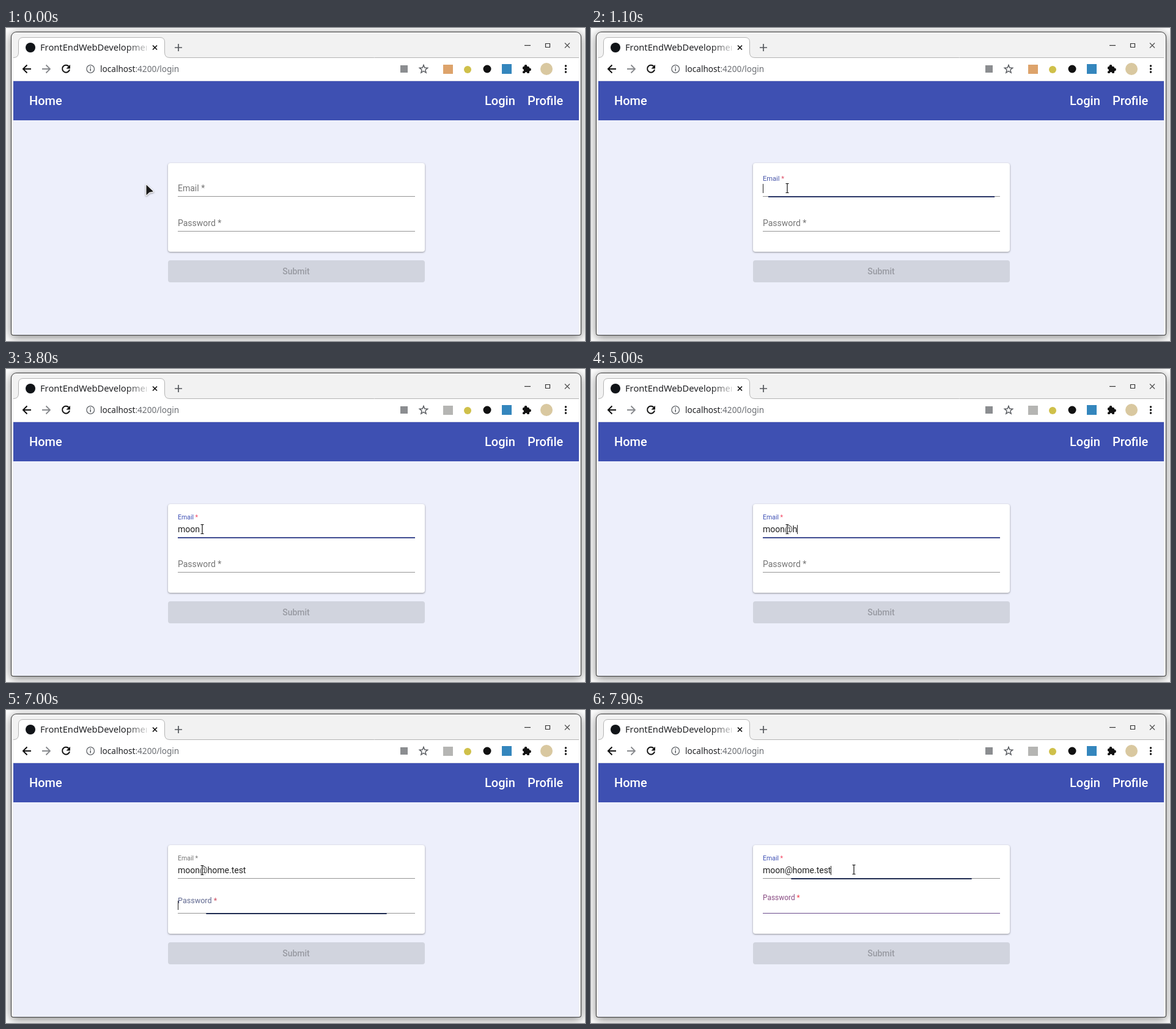
Animation, 947 px wide and 512 px high, one loop 8000 ms. Source, as an HTML page with a canvas:

```html
<!DOCTYPE html>
<html lang="en">
<head>
<meta charset="utf-8">
<title>Login form</title>
<style>
html, body { margin: 0; width: 100%; height: 100%; overflow: hidden; background: #fff; }
canvas { display: block; width: 100%; height: 100%; }
</style>
</head>
<body>
<canvas id="stage" width="947" height="512"></canvas>
<script>
const ctx = document.getElementById('stage').getContext('2d');
const LOOP = 8000, STEP = 100;
const UI = '"Noto Sans", sans-serif', FORM = 'Roboto, sans-serif';
const GREY = [117, 117, 117], BLUE = [63, 81, 181], PINK = [244, 67, 96], RED = [244, 67, 54];
const NAVY = [30, 42, 80], INDIGO = [63, 75, 145];
const ADDRESS = 'moon@home.test';
// [time, number of characters typed]; one stray letter comes first
const KEYS = [[2500, 0], [2700, 2], [3200, 4], [4000, 5], [5000, 6], [5200, 7], [5400, 8],
  [5500, 9], [5700, 10], [6300, 11], [6500, 12], [6700, 14]];
const EMAIL_FOCUS = 967, PASS_FOCUS = 6950, EMAIL_AGAIN = 7850;

const clamp = v => Math.max(0, Math.min(1, v));
const lerp = (a, b, k) => a + (b - a) * k;
const mix = (a, b, k) => a.map((v, i) => Math.round(lerp(v, b[i], k)));
const rgb = c => `rgb(${c})`;

// cubic-bezier(.25, .8, .25, 1)
function ease(x) {
  if (x <= 0) return 0;
  if (x >= 1) return 1;
  let lo = 0, hi = 1;
  for (let i = 0; i < 24; i++) {
    const s = (lo + hi) / 2, r = 1 - s;
    if (0.75 * r * s * (r + s) + s ** 3 < x) lo = s; else hi = s;
  }
  const r = 1 - lo;
  return 2.4 * r * r * lo + 3 * r * lo * lo + lo ** 3;
}

function rect(x, y, w, h, color) {
  ctx.fillStyle = color;
  ctx.fillRect(x, y, w, h);
}

function round(x, y, w, h, r, color) {
  ctx.beginPath();
  ctx.roundRect(x, y, w, h, r);
  ctx.fillStyle = color;
  ctx.fill();
}

function disc(x, y, r, color) {
  ctx.beginPath();
  ctx.arc(x, y, r, 0, 7);
  ctx.fillStyle = color;
  ctx.fill();
}

function stroke(d, color, width = 1) {
  ctx.strokeStyle = color;
  ctx.lineWidth = width;
  ctx.stroke(new Path2D(d));
}

function text(str, x, y, font, color, align = 'left') {
  ctx.font = font;
  ctx.fillStyle = color;
  ctx.textAlign = align;
  ctx.fillText(str, x, y);
}

function shadow(color, blur, dy) {
  ctx.shadowColor = color;
  ctx.shadowBlur = blur;
  ctx.shadowOffsetY = dy;
}

const noShadow = () => shadow('transparent', 0, 0);

function drawWindow() {
  rect(0, 0, 947, 512, '#fff');
  shadow('rgba(0,0,0,.5)', 16, 3);
  round(8, 6, 933, 497, [9, 9, 4, 4], '#3c3c3c');
  noShadow();
  round(9, 7, 931, 495, [8, 8, 3, 3], '#f2f2f2');
  rect(12, 48, 925, 39, '#fff');
  rect(12, 87, 925, 412, '#edeffb');
  rect(12, 499, 925, 3, '#edeffb');
  rect(12, 86, 925, 1, '#d9dbe6');
  rect(12, 87, 925, 64, '#3e50b2');
}

function drawTab() {
  ctx.fillStyle = '#fff';
  const tab = 'M12 48.5 Q20.5 48.5 20.5 40 V23 Q20.5 15.5 28 15.5 H252 Q259.5 15.5 259.5 23 V40 Q259.5 48.5 268 48.5';
  ctx.fill(new Path2D(tab));
  stroke(tab + ' H937', '#b4b4b4');
  rect(22, 48, 236, 1, '#fff');
  disc(40, 32, 8, '#111418');

  const fade = ctx.createLinearGradient(196, 0, 232, 0);
  fade.addColorStop(0, '#202124');
  fade.addColorStop(1, 'rgba(32,33,36,.15)');
  ctx.save();
  ctx.beginPath();
  ctx.rect(50, 16, 180, 30);
  ctx.clip();
  text('FrontEndWebDevelopment', 56, 37, '14.7px ' + UI, fade);
  ctx.restore();

  stroke('M240 28.5 l7 7 m0 -7 l-7 7', '#111', 1.7);
  stroke('M276 32 h12 M282 26 v12', '#55585d', 1.7);
  stroke('M848 28.5 h10', '#333', 1.2);
  stroke('M882.5 25.5 h7 v6 h-7 z', '#333', 1.2);
  stroke('M914 24.5 l8 8 m0 -8 l-8 8', '#555', 1.3);
}

function drawStar(x, y) {
  ctx.beginPath();
  for (let i = 0; i < 10; i++) {
    const a = i * Math.PI / 5 - Math.PI / 2, r = i % 2 ? 3 : 7;
    ctx.lineTo(x + r * Math.cos(a), y + r * Math.sin(a));
  }
  ctx.closePath();
  ctx.strokeStyle = '#55585d';
  ctx.lineWidth = 1.4;
  ctx.stroke();
}

function drawAddressBar(t) {
  stroke('M41 67 H28.5 M34.5 60.5 L28 67 L34.5 73.5', '#111', 2);
  stroke('M59 67 H71.5 M65.5 60.5 L72 67 L65.5 73.5', '#87898d', 1.8);
  stroke('M102.5 62.5 A6 6 0 1 0 104 68', '#111', 2);
  ctx.fillStyle = '#111';
  ctx.fill(new Path2D('M105 60 v6.5 h-6.5 z'));
  stroke('M144.5 67 a6.3 6.3 0 1 1 -12.6 0 a6.3 6.3 0 1 1 12.6 0', '#5f6368', 1.3);
  rect(137.4, 66, 1.6, 4.5, '#5f6368');
  rect(137.4, 63, 1.6, 1.7, '#5f6368');

  const font = '13.6px ' + UI, host = 'localhost';
  text(host, 154, 72, font, '#202124');
  text(':4200/login', 154 + ctx.measureText(host).width, 72, font, '#6b6e73');

  rect(645, 61, 12, 12, '#8b8d90');
  drawStar(683, 67.5);
  rect(715, 60, 16, 15, t < 2000 ? '#dda36b' : '#b5b5b3');
  disc(755, 68, 6, '#cfc04a');
  disc(787, 67, 6.5, '#111');
  rect(811, 59, 16, 16, '#3486bd');

  round(845, 63, 11, 11, 1.5, '#111');
  disc(850, 62.5, 2.4, '#111');
  disc(856.5, 68, 2.4, '#111');
  disc(845, 69, 2, '#fff');
  disc(850.5, 74, 2, '#fff');

  disc(884, 67, 10, '#d9c8a0');
  for (const y of [62, 67, 72]) disc(915.5, y, 1.7, '#111');
}

function drawPage() {
  const nav = '500 20px ' + FORM;
  text('Home', 38, 126, nav, '#fff');
  text('Login', 783, 126, nav, '#fff');
  text('Profile', 853, 126, nav, '#fff');

  shadow('rgba(0,0,0,.4)', 3, 1);
  round(265, 221, 420, 145, 4, '#fff');
  noShadow();
  round(265, 380, 420, 36, 4, '#d1d4de');
  text('Submit', 474.5, 403, '500 14px ' + FORM, '#989aa2', 'center');
}

// float: 0 = resting inside the field, 1 = small above it
function drawLabel(name, base, float, color, starColor) {
  ctx.save();
  ctx.translate(281, base - 21 * float);
  ctx.scale(1 - float / 4, 1 - float / 4);
  const font = '14px ' + FORM;
  text(name + ' ', 0, 0, font, rgb(color));
  text('*', ctx.measureText(name + ' ').width, 0, font, rgb(starColor));
  ctx.restore();
}

function drawRipple(y, age) {
  const k = ease(age / 300), w = 388 * (0.5 + k / 2);
  rect(475 - w / 2, y, w, 2, rgb(mix(NAVY, INDIGO, clamp((age - 50) / 250))));
}

function drawCaret(x, y, age) {
  if (age >= 0 && age < 600) rect(Math.round(x), y, 1, 15, '#222');
}

function drawEmail(t) {
  const again = t >= EMAIL_AGAIN;
  const focused = again || (t >= EMAIL_FOCUS && t < PASS_FOCUS);
  const start = again ? EMAIL_AGAIN : EMAIL_FOCUS;
  const float = ease((t - EMAIL_FOCUS) / 400);
  const tint = focused ? (again ? 1 : float) : 0;
  rect(281, 275, 388, 1, '#949494');
  drawLabel('Email', 267, float, mix(GREY, BLUE, tint), mix(GREY, PINK, tint));

  let value = t >= 1800 ? 'd' : '', last = t >= 1800 ? 1800 : start;
  for (const [time, count] of KEYS) {
    if (t >= time) {
      value = ADDRESS.slice(0, count);
      last = time;
    }
  }
  text(value, 281, 267, '14px ' + FORM, '#212121');
  if (!focused) return;
  drawRipple(275, t - start);
  drawCaret(281 + ctx.measureText(value).width, 255, t - Math.max(last, start));
}

function drawPassword(t) {
  const left = t >= EMAIL_AGAIN, age = t - PASS_FOCUS;
  const back = ease((t - EMAIL_AGAIN) / 400);
  const float = ease(age / 400) * (1 - back);
  const tint = ease(age / 400);
  const color = left ? mix(BLUE, RED, back) : mix(GREY, BLUE, tint);
  const star = left ? mix(PINK, RED, back) : mix(GREY, PINK, age > 0 ? 0.5 + tint / 2 : 0);
  rect(281, 332, 388, 1, left ? '#6a4a8c' : '#949494');
  if (!left && age >= 0) {
    drawRipple(332, age);
    drawCaret(281, 312, age);
  }
  drawLabel('Password', 324, float, color, star);
}

function drawArrow(x, y) {
  ctx.save();
  ctx.translate(x, y);
  const d = 'M.5 .5 L12 11.5 L5.5 12.8 L.5 17.5 Z';
  ctx.lineJoin = 'round';
  shadow('rgba(0,0,0,.4)', 3, 1);
  stroke(d, '#fff', 2.4);
  noShadow();
  ctx.fillStyle = '#1a1a1a';
  ctx.fill(new Path2D(d));
  ctx.restore();
}

function drawBeam(x, y) {
  ctx.save();
  ctx.translate(Math.round(x), Math.round(y));
  const d = 'M-2.5 -7.5 H2.5 M-2.5 7.5 H2.5 M0 -7.5 V7.5';
  ctx.lineCap = 'square';
  stroke(d, '#fff', 3);
  ctx.lineCap = 'butt';
  stroke(d, '#111', 1.2);
  ctx.restore();
}

function drawPointer(t) {
  const inK = clamp((t - 400) / 500), outK = clamp((t - 7400) / 400);
  const smooth = k => k * k * (3 - 2 * k);
  const x = lerp(229, 321, smooth(inK)) + 109 * smooth(outK);
  const y = lerp(256, 262, smooth(inK)) - outK;
  if (x < 281) drawArrow(x, y); else drawBeam(x, y);
}

function draw(now) {
  const t = Math.floor((now % LOOP) / STEP) * STEP;
  drawWindow();
  drawTab();
  drawAddressBar(t);
  drawPage();
  drawEmail(t);
  drawPassword(t);
  drawPointer(t);
}

let origin;
function tick(now) {
  origin ??= now;
  draw(now - origin);
  requestAnimationFrame(tick);
}
draw(0);
requestAnimationFrame(tick);
</script>
</body>
</html>
```
